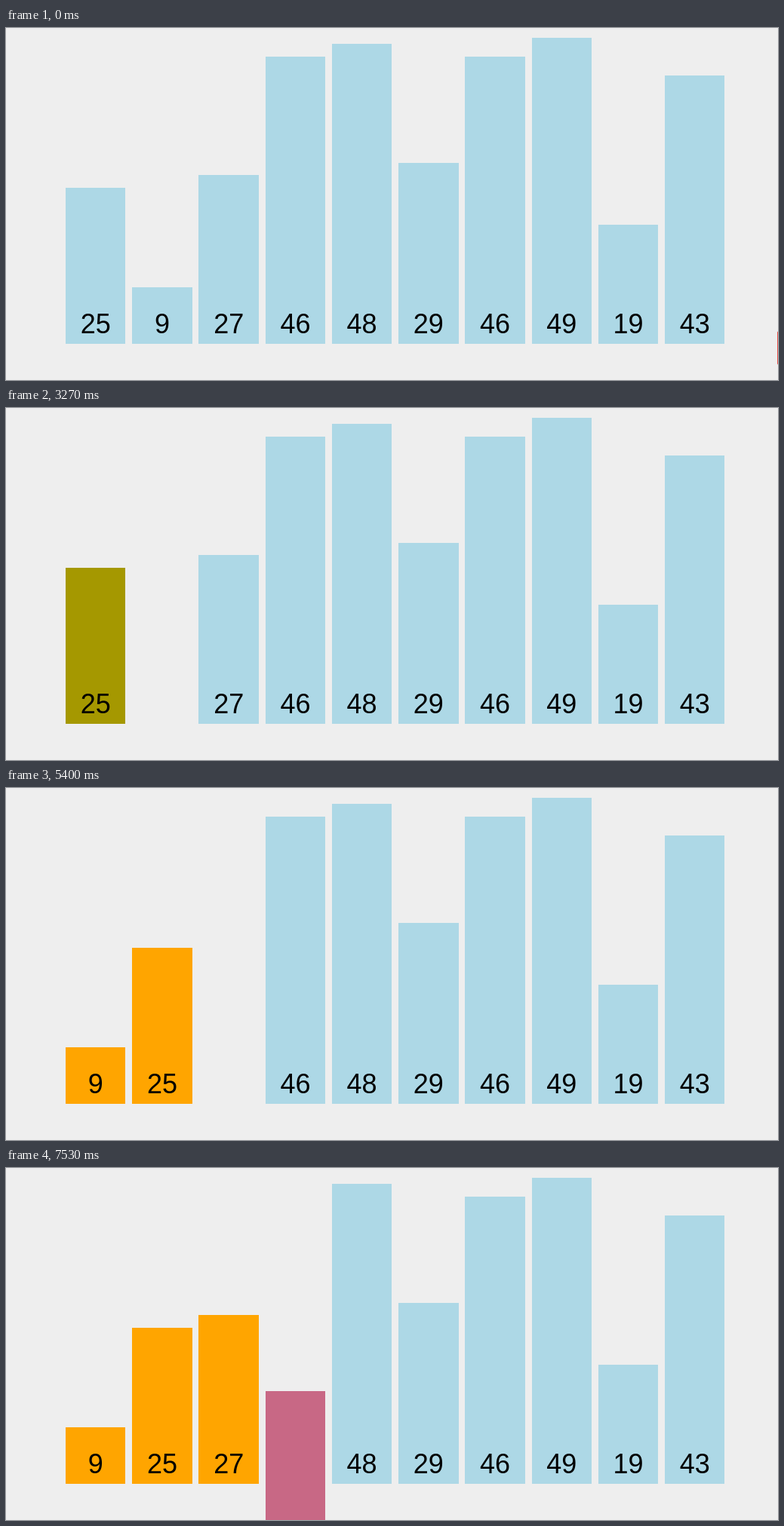
These frames come from a looping animation (1023x467 px, 8 s). An HTML page:

```html
<!DOCTYPE html>
<html lang="en">
<head>
<meta charset="utf-8">
<title>Insertion sort</title>
<style>
  html, body { margin: 0; width: 100%; height: 100%; overflow: hidden; background: #eee; }
  svg { display: block; width: 1023px; height: 467px; }
  rect { shape-rendering: crispEdges; }
  text { font: 36px "Liberation Sans", Arial, sans-serif; text-anchor: middle; }
  #tab { fill: #e8514a; shape-rendering: auto; }
</style>
</head>
<body>
<svg viewBox="0 0 1023 467">
  <g id="bars"></g>
  <rect id="tab" x="1022" y="402.5" width="8" height="44" rx="1.5"/>
</svg>
<script>
const LOOP = 8000, FPS = 15, FADE = 260;
const LEFT = 79.05, PITCH = 88.22, WIDTH = 79.4;
const BASE = 418.75, UNIT = 8.28, DROP = 450;

const BLUE = [173, 216, 230], ORANGE = [255, 165, 0];
const GREEN = [0, 128, 0], RED = [220, 20, 60];
const values = [25, 9, 27, 46, 48, 29, 46, 49, 19, 43];

// [start, bar index, properties to reach]
const steps = [
  [1030, 0, { color: ORANGE }],
  [2440, 1, { color: RED, drop: 1 }],
  [3151, 0, { color: GREEN }],
  [3850.5, 0, { slot: 1 }],
  [3850.5, 1, { slot: 0 }],
  [4548, 0, { color: ORANGE }],
  [4548, 1, { color: ORANGE, drop: 0 }],
  [5242, 2, { color: RED, drop: 1 }],
  [5955, 0, { color: GREEN }],
  [6646.5, 0, { color: ORANGE }],
  [6646.5, 2, { color: ORANGE, drop: 0 }],
  [7330, 3, { color: RED, drop: 1 }]
];
const tabSteps = [[0, 1], [330, 0.8], [660, 0.6], [860, 0]];

function add(parent, tag, attrs) {
  const el = document.createElementNS("http://www.w3.org/2000/svg", tag);
  for (const key in attrs) el.setAttribute(key, attrs[key]);
  return parent.appendChild(el);
}

const holder = document.getElementById("bars");
const tab = document.getElementById("tab");

const bars = values.map(value => {
  const group = add(holder, "g", {});
  const height = value * UNIT;
  const rect = add(group, "rect", { y: BASE - height, width: WIDTH, height });
  add(group, "text", { x: WIDTH / 2, y: 405 }).textContent = value;
  return { group, rect };
});

function ease(u) {
  u = Math.max(0, Math.min(1, u));
  return u < 0.5 ? 4 * u ** 3 : 1 - 4 * (1 - u) ** 3;
}

const mix = (a, b, p) =>
  Array.isArray(a) ? a.map((v, i) => mix(v, b[i], p)) : a + (b - a) * p;

function draw(time) {
  const states = values.map((_, slot) => ({ color: BLUE, slot, drop: 0 }));
  for (const [start, index, goal] of steps) {
    const p = ease((time - start) / FADE);
    const state = states[index];
    for (const key in goal) state[key] = mix(state[key], goal[key], p);
  }
  states.forEach(({ color, slot, drop }, i) => {
    const x = LEFT + slot * PITCH;
    bars[i].group.setAttribute("transform", `translate(${x} ${drop * DROP})`);
    bars[i].rect.setAttribute("fill", `rgb(${color.map(Math.round)})`);
  });
  tab.setAttribute("opacity", tabSteps.filter(([at]) => at <= time).pop()[1]);
}

const begin = performance.now();
function tick() {
  const time = (performance.now() - begin) % LOOP;
  draw(Math.floor(time * FPS / 1000) * 1000 / FPS);
  requestAnimationFrame(tick);
}
tick();
</script>
</body>
</html>
```
